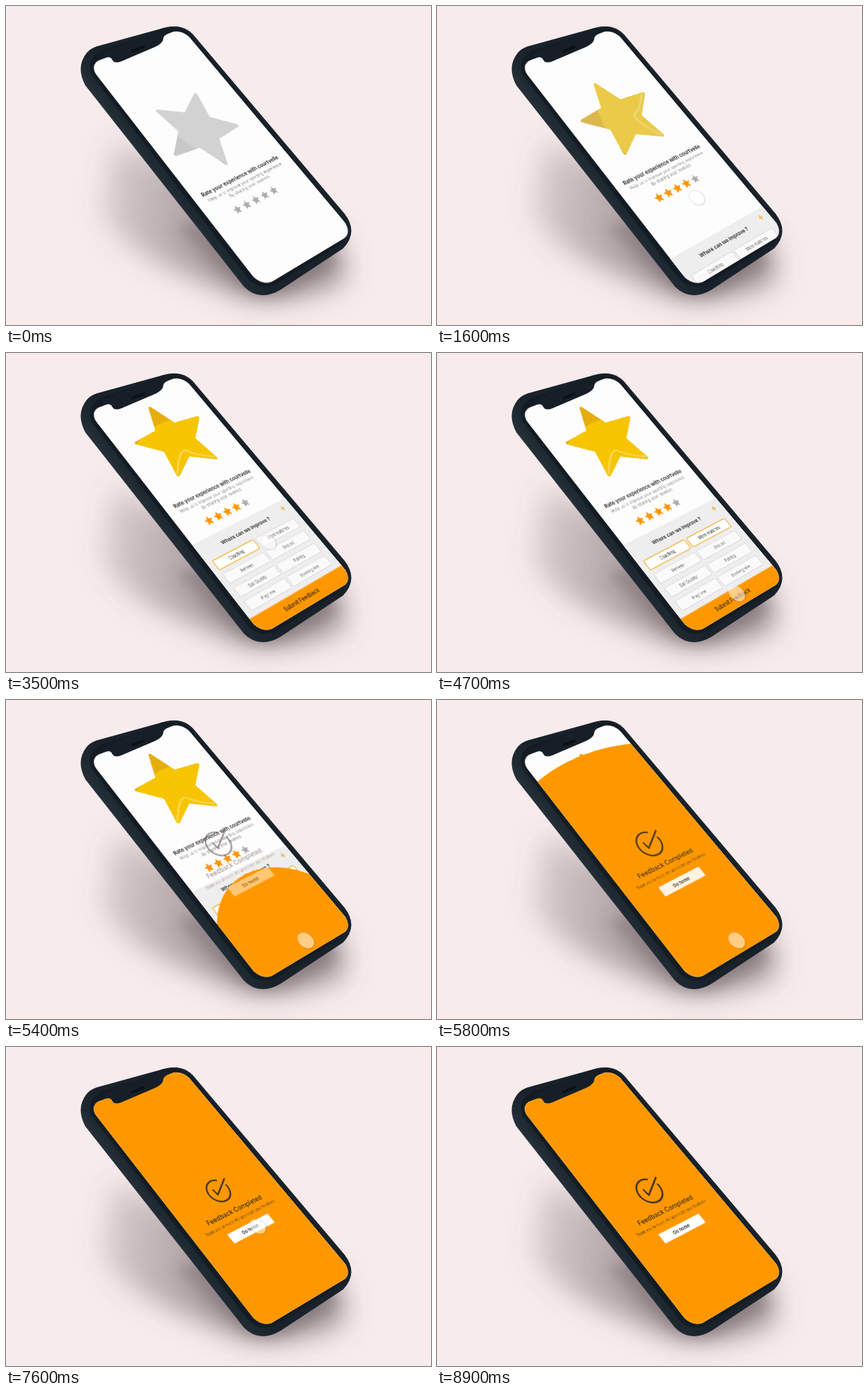
An HTML page that plays this animation: 600x450 px, repeating every 9400 ms.

```html
<!DOCTYPE html>
<html lang="en">
<head>
<meta charset="utf-8">
<title>Rating flow</title>
<style>
html, body { margin: 0; width: 100%; height: 100%; overflow: hidden; background: #f7ebeb; }
.stage { position: relative; width: 600px; height: 450px; overflow: hidden; }
.stage > svg { position: absolute; left: 0; top: 0; }

/* flat screen laid onto the tilted phone */
.screen {
  position: absolute; left: 0; top: 0; width: 168.75px; height: 365.4px;
  border-radius: 19px; overflow: hidden; background: #fefdfe;
  transform-origin: 0 0;
  transform: matrix3d(.87852, -.28877, 0, .00038785, .57025, .75252, 0, -.00027879, 0, 0, 1, 0, 116.3, 82.4, 0, 1);
}
.screen svg { display: block; width: 100%; height: 100%; }
text { font-family: Inter, Roboto, sans-serif; text-anchor: middle; }

.page, .panel, .hero, .gold, .lit, .bar, .barText, .pick1, .pick2, .flood, .done, .icon, .dot {
  animation: 9400ms linear infinite both;
}
.page { animation-name: page; }
.panel { animation-name: panel; }
.hero { animation-name: hero; }
.gold { animation-name: gold; }
.lit { animation-name: lit; }
.bar { animation-name: bar; }
.barText { animation-name: barText; }
.pick1 { animation-name: pick1; }
.pick2 { animation-name: pick2; }
.flood { animation-name: flood; }
.done { animation-name: done; }
.icon { animation-name: icon; }
.dot { animation-name: move, show; }

@keyframes page {
  0%, 12.55% { transform: translate(0, 130px); animation-timing-function: ease-in; }
  21.28%, 100% { transform: none; }
}
@keyframes panel {
  0%, 12.55% { transform: translate(0, 312px); animation-timing-function: ease-in; }
  21.28%, 100% { transform: none; }
}
@keyframes hero {
  0%, 12.55% { transform: translate(171px, 330px) rotate(-108deg); animation-timing-function: ease-in; }
  21.28%, 100% { transform: translate(191px, 195px) rotate(0deg); }
}
@keyframes gold { 0%, 12.2% { opacity: 0; } 19.5%, 100% { opacity: 1; } }
@keyframes lit { 0%, 12.2% { opacity: 0; } 14.9%, 100% { opacity: 1; } }
@keyframes bar { 0%, 31.6% { fill: #fcd48c; } 35.6%, 100% { fill: #ff9800; } }
@keyframes barText { 0%, 31.6% { fill: #ad9d80; } 35.6%, 100% { fill: #3a2a12; } }
@keyframes pick1 { 0%, 31.4% { opacity: 0; } 34.5%, 100% { opacity: 1; } }
@keyframes pick2 { 0%, 42.1% { opacity: 0; } 45%, 100% { opacity: 1; } }
@keyframes flood {
  0%, 52.66% { transform: translate(188px, 775px) scale(0); animation-timing-function: ease-in; }
  62.77%, 100% { transform: translate(188px, 775px) scale(1); }
}
@keyframes done { 0%, 53% { opacity: 0; } 62.77%, 100% { opacity: 1; } }
@keyframes icon {
  0%, 62.8% { transform: translate(181px, 413px) scale(1); animation-timing-function: ease-out; }
  70.2%, 73.9% { transform: translate(181px, 413px) scale(.57); animation-timing-function: ease-in-out; }
  84%, 100% { transform: translate(181px, 413px) scale(1); }
}
@keyframes move {
  0%, 1.6% { transform: translate(304px, 684px); animation-timing-function: ease-in-out; }
  10.64%, 22.9% { transform: translate(204px, 600px); animation-timing-function: ease-out; }
  29.8%, 33% { transform: translate(129px, 606px); animation-timing-function: ease-in-out; }
  40.4%, 43.1% { transform: translate(270px, 592px); animation-timing-function: ease-in-out; }
  48.94%, 63.3% { transform: translate(207px, 776px); }
  73.4%, 100% { transform: translate(211px, 560px); }
}
@keyframes show {
  0%, 1.6% { opacity: 0; }
  3.7%, 85.1% { opacity: 1; }
  85.11%, 100% { opacity: 0; }
}
</style>
</head>
<body>
<div class="stage">
  <svg width="600" height="450" viewBox="0 0 600 450">
    <defs>
      <filter id="soft" x="-30%" y="-30%" width="160%" height="160%"><feGaussianBlur stdDeviation="19"/></filter>
      <filter id="near" x="-30%" y="-30%" width="160%" height="160%"><feGaussianBlur stdDeviation="9"/></filter>
      <linearGradient id="shade" gradientUnits="userSpaceOnUse" x1="135" y1="300" x2="330" y2="330">
        <stop offset="0" stop-color="#6e5f64" stop-opacity=".22"/>
        <stop offset="1" stop-color="#6e5f64" stop-opacity=".68"/>
      </linearGradient>
      <linearGradient id="body" gradientUnits="userSpaceOnUse" x1="205" y1="240" x2="240" y2="214">
        <stop offset="0" stop-color="#28323a"/>
        <stop offset=".35" stop-color="#1f2931"/>
        <stop offset="1" stop-color="#19222a"/>
      </linearGradient>
    </defs>
    <path d="M150 190L136 290Q160 340 240 372L340 412Q400 420 478 388L470 330L300 250Z" fill="url(#shade)" filter="url(#soft)"/>
    <path d="M240 310L330 398Q360 420 400 405L470 362L440 330L300 300Z" fill="#6e5f64" fill-opacity=".4" filter="url(#near)"/>
    <path d="M128 57L226 30Q250 25 264 40L478 293Q498 319 476 342L388 400Q358 418 336 396L112 112Q98 86 114 66Q119 60 128 57Z" fill="url(#body)"/>
    <path d="M134 63L228 33Q247 28 260 41L476 300Q491 320 472 336L384 391Q358 404 341 384L121 97Q112 76 134 63Z" fill="#141c23"/>
  </svg>

  <div class="screen">
    <svg viewBox="0 0 375 812" preserveAspectRatio="none">
      <defs>
        <radialGradient id="goldFill" gradientUnits="userSpaceOnUse" cx="10" cy="230" r="300">
          <stop offset=".995" stop-color="#f6c500"/><stop offset="1" stop-color="#e6ae0c"/>
        </radialGradient>
        <radialGradient id="grayFill" gradientUnits="userSpaceOnUse" cx="10" cy="230" r="300">
          <stop offset=".995" stop-color="#d3d2d3"/><stop offset="1" stop-color="#c9c8c9"/>
        </radialGradient>
        <path id="star" d="M0-129L35-48.5L122.7-39.9L57 18.5L75.8 104.4L0 60L-75.8 104.4L-57 18.5L-122.7-39.9L-35-48.5Z" stroke-width="11" stroke-linejoin="round"/>
        <use id="mini" href="#star" transform="scale(.112)"/>
        <rect id="chip" x="-80" y="-16" width="160" height="32" rx="4"/>
      </defs>

      <g class="hero">
        <use href="#star" fill="url(#grayFill)" stroke="url(#grayFill)"/>
        <g class="gold">
          <use href="#star" fill="url(#goldFill)" stroke="url(#goldFill)"/>
          <path d="M-74 100Q-8 24 8 48T74 98" fill="none" stroke="#fbd650" stroke-width="6" stroke-linecap="round"/>
        </g>
      </g>

      <g class="page">
        <text x="185" y="388" font-size="17.4" font-weight="600" fill="#26262a">Rate your experience with courtvelle</text>
        <g font-size="14" fill="#8d8b8e">
          <text x="186" y="409">Help us to improve your sporting experience</text>
          <text x="186" y="426">By sharing your reviews</text>
        </g>
        <g fill="#adabad">
          <use href="#mini" x="0" transform="translate(100 465)"/>
          <use href="#mini" transform="translate(136.3 465)"/>
          <use href="#mini" transform="translate(172.6 465)"/>
          <use href="#mini" transform="translate(208.9 465)"/>
          <use href="#mini" transform="translate(245.2 465)"/>
        </g>
        <g class="lit" fill="#ff9500" stroke="#ff9500">
          <use href="#mini" transform="translate(100 465)"/>
          <use href="#mini" transform="translate(136.3 465)"/>
          <use href="#mini" transform="translate(172.6 465)"/>
          <use href="#mini" transform="translate(208.9 465)"/>
        </g>
      </g>

      <g class="panel">
        <rect y="506" width="375" height="306" fill="#efeeef"/>
        <text x="182" y="545" font-size="16.5" font-weight="600" fill="#26262a">Where can we improve ?</text>
        <path d="M335 531H351M343 523V539" stroke="#f0a818" stroke-width="2.6"/>
        <g fill="#fbfafb" stroke="#d6d4d6" stroke-width="1.6">
          <use href="#chip" x="101" y="588"/><use href="#chip" x="270" y="588"/>
          <use href="#chip" x="101" y="634"/><use href="#chip" x="270" y="634"/>
          <use href="#chip" x="101" y="681"/><use href="#chip" x="270" y="681"/>
          <use href="#chip" x="101" y="727"/><use href="#chip" x="270" y="727"/>
        </g>
        <g font-size="13" fill="#6b696c">
          <text x="101" y="593">Coaching</text><text x="270" y="593">More matches</text>
          <text x="101" y="639">Refrees</text><text x="270" y="639">Ground</text>
          <text x="101" y="686">Ball Quality</text><text x="270" y="686">Pairing</text>
          <text x="101" y="732">Playtime</text><text x="270" y="732">Booking site</text>
        </g>
        <g font-size="13" fill="#333">
          <g class="pick1">
            <use href="#chip" x="101" y="588" fill="#fff" stroke="#eeae2c" stroke-width="2.6"/>
            <text x="101" y="593">Coaching</text>
          </g>
          <g class="pick2">
            <use href="#chip" x="270" y="588" fill="#fff" stroke="#eeae2c" stroke-width="2.6"/>
            <text x="270" y="593">More matches</text>
          </g>
        </g>
        <rect class="bar" y="759" width="375" height="53"/>
        <text class="barText" x="182" y="791" font-size="17" font-weight="500">Submit Feedback</text>
      </g>

      <circle class="flood" r="850" fill="#ff9800"/>

      <g class="done">
        <g class="icon" fill="none" stroke="#3a3020" stroke-width="5.5" stroke-linecap="round" stroke-linejoin="round">
          <path d="M20-34.6A40 40 0 1 0 39.4-7"/>
          <path d="M-15-10L-12 11L50-28"/>
        </g>
        <text x="183" y="494" font-size="21.5" font-weight="500" fill="#3a3020">Feedback Completed</text>
        <text x="183" y="519" font-size="11.8" fill="#5c4420">Thank you so much. We appreciate your feedback</text>
        <rect x="106" y="540" width="164" height="33" rx="3" fill="#fff"/>
        <text x="184" y="562" font-size="15" font-weight="600" fill="#2c2c30">Go home</text>
      </g>

      <g class="dot">
        <circle cx="2" cy="3" r="24" fill="none" stroke="#6a5a50" stroke-opacity=".22" stroke-width="3"/>
        <circle r="23.5" fill="#fff" fill-opacity=".52" stroke="#fff" stroke-opacity=".35" stroke-width="2"/>
      </g>
    </svg>
  </div>

  <svg width="600" height="450" viewBox="0 0 600 450">
    <path d="M138 73.5Q148 70 150 76Q153 82 163 78L211 57.500Q222 52 222 46Q222 42 230 38L222 31L138 66Z" fill="#161f27"/>
    <path d="M179 63.500L194 57.500" stroke="#0b1117" stroke-width="4" stroke-linecap="round"/>
  </svg>
</div>
</body>
</html>
```
